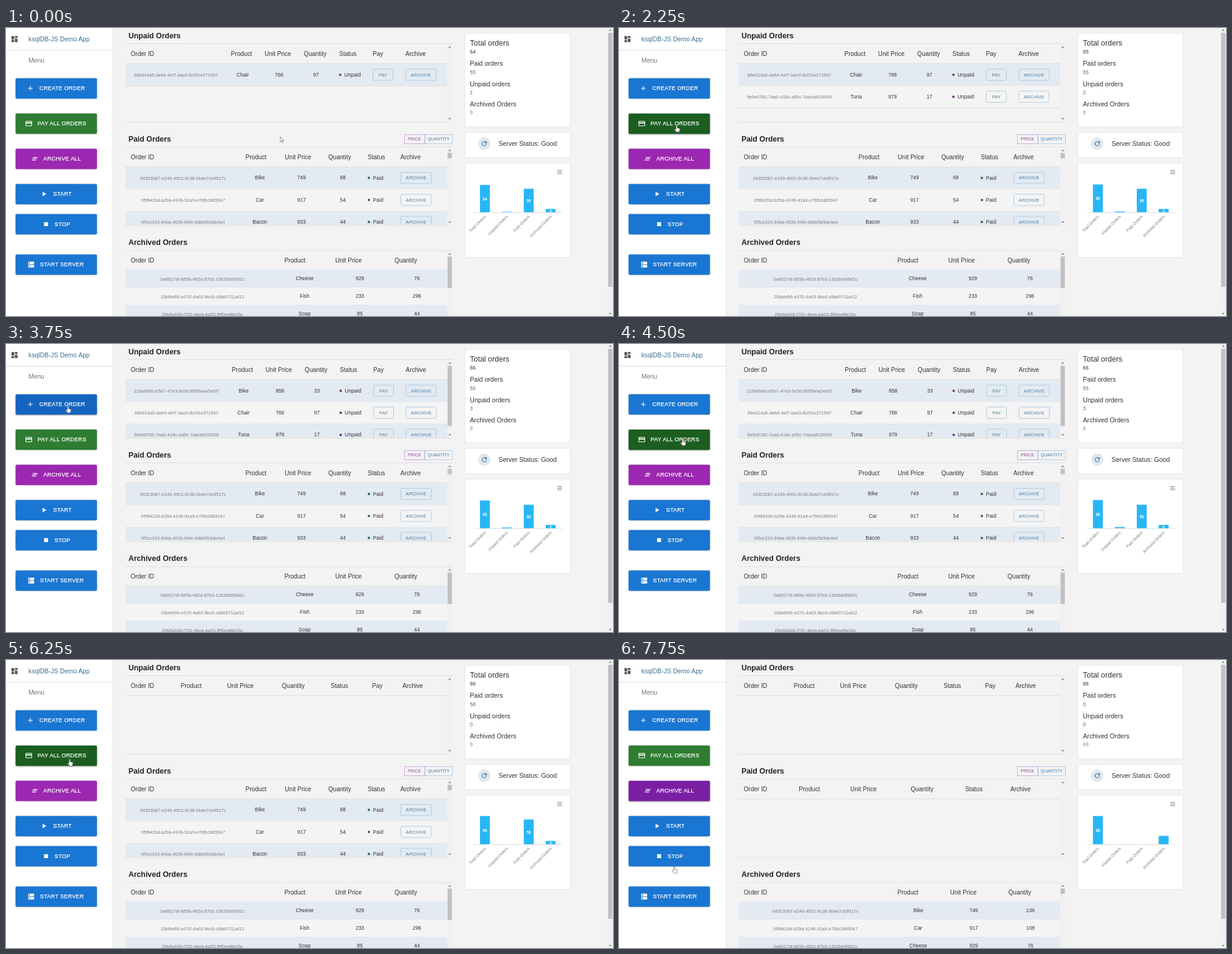
An HTML page that plays this animation: 1000x474 px, repeating every 8 s.

```html
<!DOCTYPE html>
<html lang="en">
<head>
<meta charset="utf-8">
<title>Order dashboard</title>
<style>
  html, body { margin: 0; width: 100%; height: 100%; overflow: hidden; background: #f3f3f3; }
  svg { display: block; width: 1000px; height: 474px; font-family: "Liberation Sans", Arial, sans-serif; }
  .btn { filter: drop-shadow(0 .8px .8px rgba(0, 0, 0, .3)); }
  .btn.hot { filter: drop-shadow(0 1.2px 1.2px rgba(0, 0, 0, .42)); }
</style>
</head>
<body>
<svg id="stage" viewBox="0 0 1000 474"></svg>
<script>
const LOOP = 8000, STEP = 250;
const stage = document.getElementById('stage');

const ICON = {
  board: 'M3 13h8V3H3zM3 21h8v-6H3zM13 21h8V11h-8zM13 3v6h8V3z',
  add: 'M19 13h-6v6h-2v-6H5v-2h6V5h2v6h6z',
  card: 'M4 4h16q2 0 2 2v12q0 2-2 2H4q-2 0-2-2V6q0-2 2-2zM4 12v6h16v-6zM4 6v2h16V6z',
  clear: 'M5 13h14v-2H5zM3 17h14v-2H3zM7 7v2h14V7z',
  play: 'M8 5v14l11-7z',
  stop: 'M6 6h12v12H6z',
  server: 'M3 3h18v8H3zM3 13h18v8H3zM7 9a2 2 0 1 0 0-4 2 2 0 0 0 0 4zM7 19a2 2 0 1 0 0-4 2 2 0 0 0 0 4z',
  refresh: 'M17.65 6.35A8 8 0 1 0 19.73 14h-2.08A6 6 0 1 1 16.22 7.78L13 11h7V4z'
};

const BLUE = [[25, 118, 210], [21, 101, 192]];
const GREEN = [[46, 125, 50], [27, 94, 32]];
const PURPLE = [[156, 39, 176], [123, 31, 162]];
// y, label, label x, icon, icon x, colours
const BUTTONS = [
  [83, 'CREATE ORDER', 55, 'add', 40, BLUE],
  [141, 'PAY ALL ORDERS', 52, 'card', 37.5, GREEN],
  [199, 'ARCHIVE ALL', 61.5, 'clear', 47, PURPLE],
  [257, 'START', 77.8, 'play', 62.5, BLUE],
  [306.5, 'STOP', 80, 'stop', 66, BLUE],
  [373, 'START SERVER', 56, 'server', 41.5, BLUE]
];

// time, total, paid, unpaid, archived
const COUNTS = [
  [0, 64, 55, 1, 8], [1500, 65, 55, 2, 8], [3750, 66, 55, 3, 8],
  [5250, 66, 58, 0, 8], [7500, 66, 0, 0, 66]
];

// time, x, y of the pointer tip
const PATH = [
  [0, 452, 179], [250, 350, 165], [500, 190, 128], [750, 110, 104], [1000, 98, 102],
  [1500, 98, 102], [1750, 96, 128], [2000, 95, 160], [2500, 95, 160], [2750, 100, 206],
  [3000, 100, 134], [3250, 101, 101], [3750, 102, 102], [4000, 104, 129], [4250, 105, 156],
  [5000, 105, 156], [5250, 105, 163], [6250, 105, 163], [6500, 105, 184], [6750, 104, 194],
  [7000, 104, 214], [7500, 104, 214], [7750, 91, 339.8]
];

const CHAIR = ['86e014a5-de64-4ef7-bac0-8cf31e371997', 'Chair', 766, 97];
const TUNA = ['9e9e5782-7aa0-418c-a95c-7dacb810000f', 'Tuna', 979, 17];
const BIKE2 = ['216a8b6b-b5b7-47e3-9e36-8095a4a5efd7', 'Bike', 858, 33];
const BIKE = ['04323087-e249-4501-9c38-0b4e7cb9517c', 'Bike', 749, 68];
const CAR = ['05f8420d-b29d-4249-91a9-e76fb1885047', 'Car', 917, 54];
const BACON = ['0f5cc316-84da-403b-94fe-6dbb5b3de4a4', 'Bacon', 933, 44];
const CHEESE = ['0a6617df-865b-482d-87b3-1362bbf99d2c', 'Cheese', 929, 76];
const FISH = ['20bbfe56-e370-4a63-9bc6-c8bb5711af12', 'Fish', 233, 296];
const SOAP = ['29b9a348-f792-4bea-ba53-9ff0eaf8e2bc', 'Soap', 85, 44];

const UNPAID = [[CHAIR], [CHAIR, TUNA], [BIKE2, CHAIR, TUNA], [], []];

const rect = (x, y, w, h, fill, more = '') =>
  `<rect x="${x}" y="${y}" width="${w}" height="${h}" fill="${fill}" ${more}/>`;
const line = (x, y, w, color = '#dfdfdf') => rect(x, y, w, 1, color);
const text = (x, y, s, size, color = '#333', more = '') =>
  `<text x="${x}" y="${y}" font-size="${size}" fill="${color}" ${more}>${s}</text>`;
const mid = (x, y, s, size, color, more = '') =>
  text(x, y, s, size, color, 'text-anchor="middle" ' + more);
const icon = (name, x, y, k, color) =>
  `<path d="${ICON[name]}" fill="${color}" fill-rule="evenodd" transform="translate(${x - 12 * k} ${y - 12 * k}) scale(${k})"/>`;
const arrow = (x, y, dir, color = '#777') =>
  `<path d="M${x - 2.2} ${y + dir}h4.4l-2.2 ${-2.4 * dir}z" fill="${color}"/>`;
const title = (y, s) => text(201.7, y, s, 12.4, '#222', 'font-weight="700"');
const outlined = (x, y, w, s, color, edge) =>
  rect(x + .5, y + .5, w, 18.5, 'none', `rx="2" stroke="${edge}" stroke-width=".8"`) +
  mid(x + .6 + w / 2, y + 12.3, s, 7.3, color, 'letter-spacing=".22"');
const archiveBtn = (x, y) => outlined(x, y, 50, 'ARCHIVE', '#4a7ca8', '#a5c1da');

function headers(y, names, xs) {
  return names.map((n, i) => text(xs[i], y, n, 10, '#333', 'letter-spacing=".03"')).join('');
}

function cells(row, y, xs) {
  return mid(xs[0], y + .4, row[0], 7.3, '#7b7b7b', 'letter-spacing=".09"') +
    row.slice(1).map((v, i) => mid(xs[i + 1], y, v, 8.4, '#333', 'letter-spacing=".06"')).join('');
}

function status(x, y, s, color) {
  return `<circle cx="${x}" cy="${y - 2.7}" r="2" fill="${color}"/>` +
    text(x + 6.7, y, s, 8.5, '#333', 'letter-spacing=".06"');
}

function rowsOf(rows, top, pitch, draw) {
  return rows.map((r, i) => {
    const y = top + i * pitch;
    return rect(197, y, 530, pitch, i % 2 ? '#f4f4f4' : '#e3eaf2') +
      line(197, y + pitch - .5, 530) + draw(r, y);
  }).join('');
}

function scroller(top, bottom, thumbY, thumbH) {
  return rect(727, top, 8.5, bottom - top, '#f1f1f1') +
    (thumbH ? rect(727.5, thumbY, 7, thumbH, '#c1c1c1') : '') +
    arrow(731, top + 5.5, 1) + arrow(731, bottom - 5.5, -1);
}

function unpaidTable(state) {
  const rows = UNPAID[state], s = state * .75;
  const xs = rows.length
    ? [205.5, 370.6 + s, 426 + s, 490.6 + s, 549 + s * .7, 604 + s * .7, 658 + s * .4]
    : [205.5, 287.7, 364.3, 454.5, 535, 603, 653.3];
  return title(17, 'Unpaid Orders') + line(197, 25, 539) +
    headers(46, ['Order ID', 'Product', 'Unit Price', 'Quantity', 'Status', 'Pay', 'Archive'], xs) +
    line(197, 58, 530) +
    '<g clip-path="url(#unpaid)">' +
    rowsOf(rows, 59, 36.2, (r, y) =>
      cells(r, y + 20.5, [280 + s * .7, 390 + s, 450 + s, 510.7 + s]) +
      status(550.5 + s * .6, y + 20.7, 'Unpaid', '#7b2a8c') +
      outlined(604 + s * .8, y + 8.2, 32.8, 'PAY', '#4f8387', '#a5c3c8') +
      archiveBtn(658 + s * .3, y + 8.2)) +
    '</g>' + line(197, 154.5, 539) +
    scroller(26, 155, 36, rows.length > 2 ? 99 : 0);
}

function paidTable(empty) {
  const xs = empty ? [205.5, 296.3, 381, 480.5, 570.4, 644.7]
    : [205.5, 394.5, 459.3, 531, 596, 649.7];
  return title(187, 'Paid Orders') +
    rect(656.5, 175.5, 33.5, 15, 'none', 'stroke="#c487cf" stroke-width=".7"') +
    rect(690.5, 175.5, 45, 15, 'none', 'stroke="#9dbddd" stroke-width=".7"') +
    mid(673, 185.2, 'PRICE', 6.8, '#93389f', 'letter-spacing=".2"') +
    mid(712.8, 185.2, 'QUANTITY', 6.85, '#3f7aae', 'letter-spacing=".2"') +
    line(197, 195, 539) +
    headers(215.5, ['Order ID', 'Product', 'Unit Price', 'Quantity', 'Status', 'Archive'], xs) +
    line(197, 228, 530) +
    '<g clip-path="url(#paid)">' +
    rowsOf(empty ? [] : [BIKE, CAR, BACON], 229, 36.2, (r, y) =>
      cells(r, y + 20.3, [291.7, 418.3, 486.8, 555]) +
      status(597.8, y + 20.5, 'Paid', '#2e6b50') +
      archiveBtn(650, y + 8)) +
    '</g>' + line(197, 324.5, 539) +
    scroller(196, 325, 205.5, empty ? 0 : 9);
}

function archivedTable(full) {
  const rows = full
    ? [[BIKE[0], 'Bike', 749, 136], [CAR[0], 'Car', 917, 108], CHEESE]
    : [CHEESE, FISH, SOAP];
  const d = full ? 1.5 : 0;
  return title(357, 'Archived Orders') + line(197, 366, 539) +
    headers(385.7, ['Order ID', 'Product', 'Unit Price', 'Quantity'],
      [205.5, 458.7, 542.5 + d * 2, 640 + d]) +
    line(197, 397.5, 530) +
    rowsOf(rows, 398, 29.1, (r, y) => cells(r, y + 17.2, [323.7, 492 + d * .6, 583 + d, 677 + d * .6])) +
    rect(727, 367, 8.5, 107, '#f1f1f1') +
    rect(727.5, 376, 7, full ? 9 : 52, '#c1c1c1') + arrow(731, 372, 1);
}

const card = (y, h) => rect(756, y, 173.5, h, '#fff', 'stroke="#e8e8e8" stroke-width="1"');

function stats(c) {
  const colors = ['#333', '#4d6f86', '#4d6f86', '#94849c'];
  const names = ['Total orders', 'Paid orders', 'Unpaid orders', 'Archived Orders'];
  return card(9, 153.5) + names.map((n, i) =>
    text(764.3, 28.7 + i * 33.4, n, i ? 10.6 : 12.45) +
    text(764.3, 42.2 + i * 33.3, c[i + 1], 8.5, colors[i])).join('') +
    card(172, 41.5) + '<circle cx="788" cy="190.3" r="10.3" fill="#e4e7eb"/>' +
    icon('refresh', 788, 190.3, .52, '#1d70b8') + text(811.4, 194, 'Server Status: Good', 10.6);
}

function chart(t) {
  const n = stateAt(t - STEP), cur = COUNTS[n], prev = COUNTS[Math.max(0, n - 1)];
  const fresh = n > 0 && t - STEP - cur[0] < STEP;
  const names = ['Total Orders', 'Unpaid Orders', 'Paid Orders', 'Archived Orders'];
  let out = card(223, 154.5) + rect(770, 303, 145, 1, '#e0e0e0');
  for (let i = 0; i < 3; i++) out += rect(908, 234 + i * 2.7, 8, 1, '#7a8590');
  [1, 3, 2, 4].forEach((k, i) => {
    const x = 789 + i * 36.1, v = cur[k];
    const shown = fresh && v > prev[k] ? prev[k] + (v - prev[k]) * .2 : v;
    const h = shown * .705, size = Math.min(6.3, h);
    if (v) out += rect(x - 8.2, 303.3 - h, 16.4, h, '#29b6f6', `rx="${Math.min(1, h / 2)}"`);
    if (v && v - shown < 10)
      out += mid(x, 303.3 - h / 2 + size * .45, v, size, '#fff', 'font-weight="700"');
    out += rect(x + 17.8, 304, .7, 2.5, '#e0e0e0') +
      text(x + 2, 311, names[i], 6.6, '#777', `text-anchor="end" transform="rotate(-45 ${x + 2} 311)"`);
  });
  return out;
}

function stateAt(t) {
  let n = 0;
  COUNTS.forEach((c, i) => { if (t >= c[0]) n = i; });
  return n;
}

function pointerAt(t) {
  let i = PATH.length - 1;
  while (i > 0 && PATH[i][0] > t) i--;
  const a = PATH[i], b = PATH[i + 1];
  if (!b || t <= a[0]) return [a[1], a[2]];
  const k = (t - a[0]) / (b[0] - a[0]);
  return [a[1] + (b[1] - a[1]) * k, a[2] + (b[2] - a[2]) * k];
}

const over = ([x, y], top, pad = 0) => x > 16 && x < 150 && y >= top - pad && y <= top + 33 + pad;

function sidebar(t) {
  const now = pointerAt(t), before = pointerAt(Math.max(0, t - STEP));
  return rect(0, 0, 176, 474, '#fff') + rect(176, 0, 1, 474, '#dedede') + line(0, 36, 176) +
    icon('board', 14, 18.2, .55, '#555') +
    text(37, 22, 'ksqlDB-JS Demo App', 10.5, '#3b7191') + text(37, 57, 'Menu', 10.45, '#757575') +
    BUTTONS.map(([y, label, x, name, ix, [base, dark]]) => {
      const hot = over(before, y) ? 1 : over(now, y) ? .6 : 0;
      const rgb = base.map((c, i) => Math.round(c + (dark[i] - c) * hot));
      return `<g class="btn${hot ? ' hot' : ''}">${rect(15.8, y - .3, 134, 33.6, `rgb(${rgb})`, 'rx="2"')}</g>` +
        icon(name, ix, y + 16.3, .54, '#fff') +
        text(x, y + 19.2, label, 9.2, '#fff', 'letter-spacing=".26" stroke="#fff" stroke-width=".25"');
    }).join('');
}

function pointer(t) {
  const p = pointerAt(t);
  const hand = BUTTONS.some(b => over(p, b[0], 2));
  const d = hand
    ? 'M-1 1c0-1.3 2-1.3 2 0v3.5l3.2.7c.8.2 1.2.8 1 1.6l-.7 3.2c-.2.8-.6 1.2-1.2 1.2h-2.8c-.6 0-1-.3-1.4-.8L-3.4 7.4c-.5-.8.4-1.6 1.1-1.1L-1 7.3z'
    : 'M0 0v8.6l2-1.9 1.3 3 1.3-.6-1.3-2.9h2.7z';
  return `<path d="${d}" fill="#fff" stroke="#444" stroke-width=".6" transform="translate(${p[0]} ${p[1]})"/>`;
}

const defs = '<defs><clipPath id="unpaid"><rect x="197" y="58" width="530" height="96.5"/></clipPath>' +
  '<clipPath id="paid"><rect x="197" y="228" width="530" height="96.5"/></clipPath></defs>';
const pageBar = rect(991, 0, 9, 474, '#f1f1f1') + rect(992, 8, 7, 418, '#c1c1c1') +
  arrow(995.5, 3.5, 1) + arrow(995.5, 470, -1);

function draw(t) {
  const n = stateAt(t);
  stage.innerHTML = defs + rect(0, 0, 1000, 474, '#f3f3f3') + sidebar(t) +
    unpaidTable(n) + paidTable(n === 4) + archivedTable(n === 4) +
    stats(COUNTS[n]) + chart(t) + pageBar + pointer(t);
}

const start = performance.now();
let last = -1;
function tick() {
  const t = Math.floor((performance.now() - start) % LOOP / STEP) * STEP;
  if (t !== last) draw(last = t);
  requestAnimationFrame(tick);
}
tick();
</script>
</body>
</html>
```
